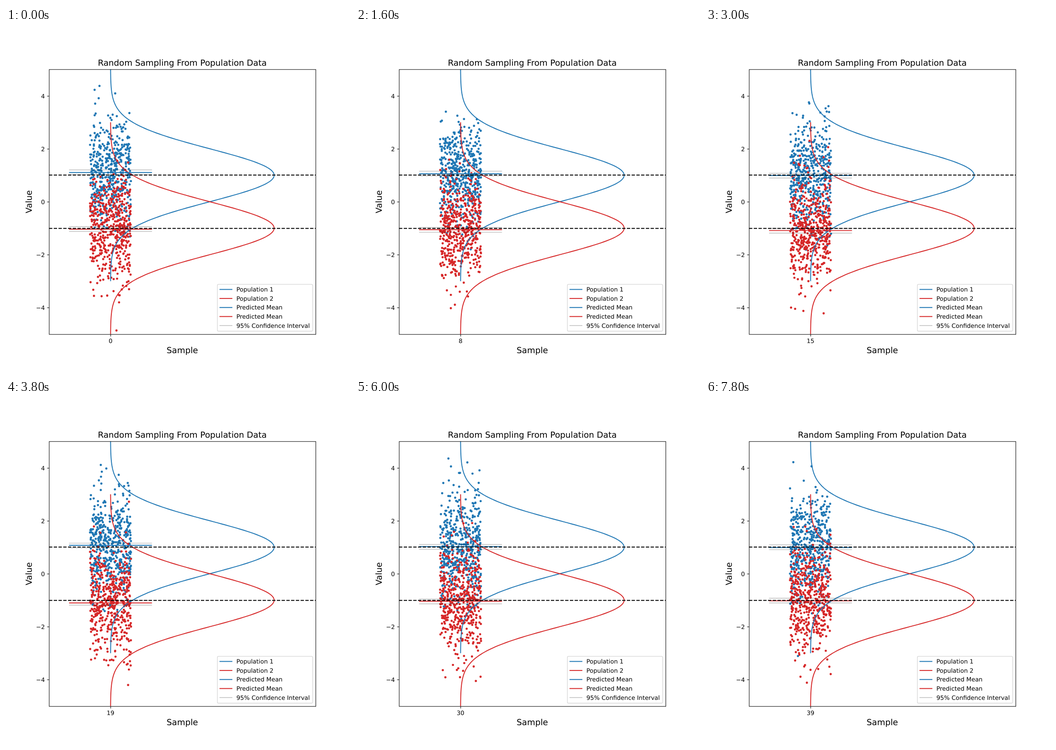
An HTML page with a canvas that plays this animation: 748x748 px, repeating every 8000 ms.

```html
<!DOCTYPE html>
<html lang="en">
<head>
<meta charset="utf-8">
<title>Random Sampling</title>
<style>
  html, body { margin: 0; width: 100%; height: 100%; overflow: hidden; background: #fff; }
  canvas, svg { position: absolute; left: 0; top: 0; display: block; }
  text { font: 13.889px "DejaVu Sans", sans-serif; fill: #000; text-rendering: geometricPrecision; }
  .big { font-size: 19.444px; }
  .mid { text-anchor: middle; }
  .end { text-anchor: end; }
  .line { fill: none; stroke-width: 2.083; }
  .cap { stroke-linecap: square; }
  .axis { fill: none; stroke: #000; stroke-width: 1.11; }
  .blue { stroke: #1f77b4; }
  .red { stroke: #d62728; }
  .ci { stroke: #000; stroke-opacity: .2; }
  .dash { stroke: #000; stroke-dasharray: 7.71 3.33; }
</style>
</head>
<body>
<canvas id="dots" width="748" height="748"></canvas>
<svg width="748" height="748" viewBox="0 0 800 800">
  <g id="curves"></g>
  <g id="levels"></g>
  <path class="line dash" d="M100 342H720"/>
  <path class="line dash" d="M100 466H720"/>
  <path class="axis" d="M100.5 96.5H720.5V712.5H100.5ZM243.5 712.5v4.9"/>
  <g id="ticks"></g>
  <text class="big mid" x="410" y="88">Random Sampling From Population Data</text>
  <text class="big mid" x="410" y="756">Sample</text>
  <text class="big mid" transform="translate(60 404) rotate(-90)">Value</text>
  <text id="count" class="mid" x="243.1" y="732.5"></text>
  <rect x="491.5" y="596.2" width="221.6" height="108.9" rx="2.78" fill="#fff" fill-opacity=".8"
        stroke="#ccc" stroke-opacity=".8" stroke-width="1.39"/>
  <g id="legend"></g>
</svg>
<script>
// The chart is laid out on an 800 unit square and scaled to the stage.
const SIZE = 800, SCALE = 748 / SIZE;
const FRAME_MS = 200, FRAMES = 40, SAMPLE = 500;
const X0 = 243.08, X_UNIT = 620 / 6.5, Y0 = 404, Y_UNIT = 61.6;
const DOT_RADIUS = 2.65;
const CI = 1.96 / Math.sqrt(SAMPLE);
const GROUPS = [
  { mean: 1, color: '#1f77b4', style: 'blue' },
  { mean: -1, color: '#d62728', style: 'red' }
];

const $ = id => document.getElementById(id);
const yOf = v => Y0 - Y_UNIT * v;
const ctx = $('dots').getContext('2d');
ctx.scale(SCALE, SCALE);
ctx.beginPath();
ctx.rect(100, 96, 620, 616);
ctx.clip();

function randomFrom(seed) {
  return () => {
    seed = (seed + 0x6D2B79F5) | 0;
    let t = Math.imul(seed ^ (seed >>> 15), 1 | seed);
    t = (t + Math.imul(t ^ (t >>> 7), 61 | t)) ^ t;
    return ((t ^ (t >>> 14)) >>> 0) / 4294967296;
  };
}

const normal = random =>
  Math.sqrt(-2 * Math.log(1 - random())) * Math.cos(2 * Math.PI * random());

function drawSample(random, { mean, color }) {
  let sum = 0;
  ctx.fillStyle = color;
  ctx.beginPath();
  for (let i = 0; i < SAMPLE; i++) {
    const value = mean + normal(random);
    const x = X0 + X_UNIT * (random() - .5), y = yOf(value);
    ctx.moveTo(x + DOT_RADIUS, y);
    ctx.arc(x, y, DOT_RADIUS, 0, 2 * Math.PI);
    sum += value;
  }
  ctx.fill();
  return sum / SAMPLE;
}

const level = (v, style) =>
  `<path class="line cap ${style}" d="M${X0 - X_UNIT} ${Math.round(yOf(v))}h${2 * X_UNIT}"/>`;

function drawFrame(index) {
  const random = randomFrom(index * 7919 + 17);
  ctx.clearRect(0, 0, SIZE, SIZE);
  $('levels').innerHTML = GROUPS.map(group => {
    const mean = drawSample(random, group);
    return level(mean, group.style) + level(mean - CI, 'ci') + level(mean + CI, 'ci');
  }).join('');
  $('count').textContent = index;
}

$('curves').innerHTML = GROUPS.map(({ mean, style }) => {
  const points = [];
  for (let z = -4; z <= 4.001; z += .04) {
    const density = Math.exp(-z * z / 2) / Math.sqrt(2 * Math.PI);
    points.push(`${(X0 + 10 * X_UNIT * density).toFixed(2)} ${yOf(mean + z).toFixed(2)}`);
  }
  return `<path class="line ${style}" d="M${points.join('L')}"/>`;
}).join('');

$('ticks').innerHTML = [4, 2, 0, -2, -4].map(v => {
  const y = Math.round(yOf(v));
  return `<path class="axis" d="M95.6 ${y + .5}h4.9"/>
    <text class="end" x="90.3" y="${y + 5.2}">${String(v).replace('-', '\u2212')}</text>`;
}).join('');

$('legend').innerHTML = [
  ['blue', 'Population 1'], ['red', 'Population 2'],
  ['blue', 'Predicted Mean'], ['red', 'Predicted Mean'],
  ['ci', '95% Confidence Interval']
].map(([style, label], i) => {
  const y = Math.round(607.9 + 20.94 * i);
  return `<path class="line cap ${style}" d="M497.6 ${y}h27.8"/>
    <text x="535.8" y="${y + 5}">${label}</text>`;
}).join('');

let shown = -1;
const start = performance.now();
function tick() {
  const index = Math.floor((performance.now() - start) / FRAME_MS) % FRAMES;
  if (index !== shown) drawFrame(shown = index);
  requestAnimationFrame(tick);
}
tick();
</script>
</body>
</html>
```
